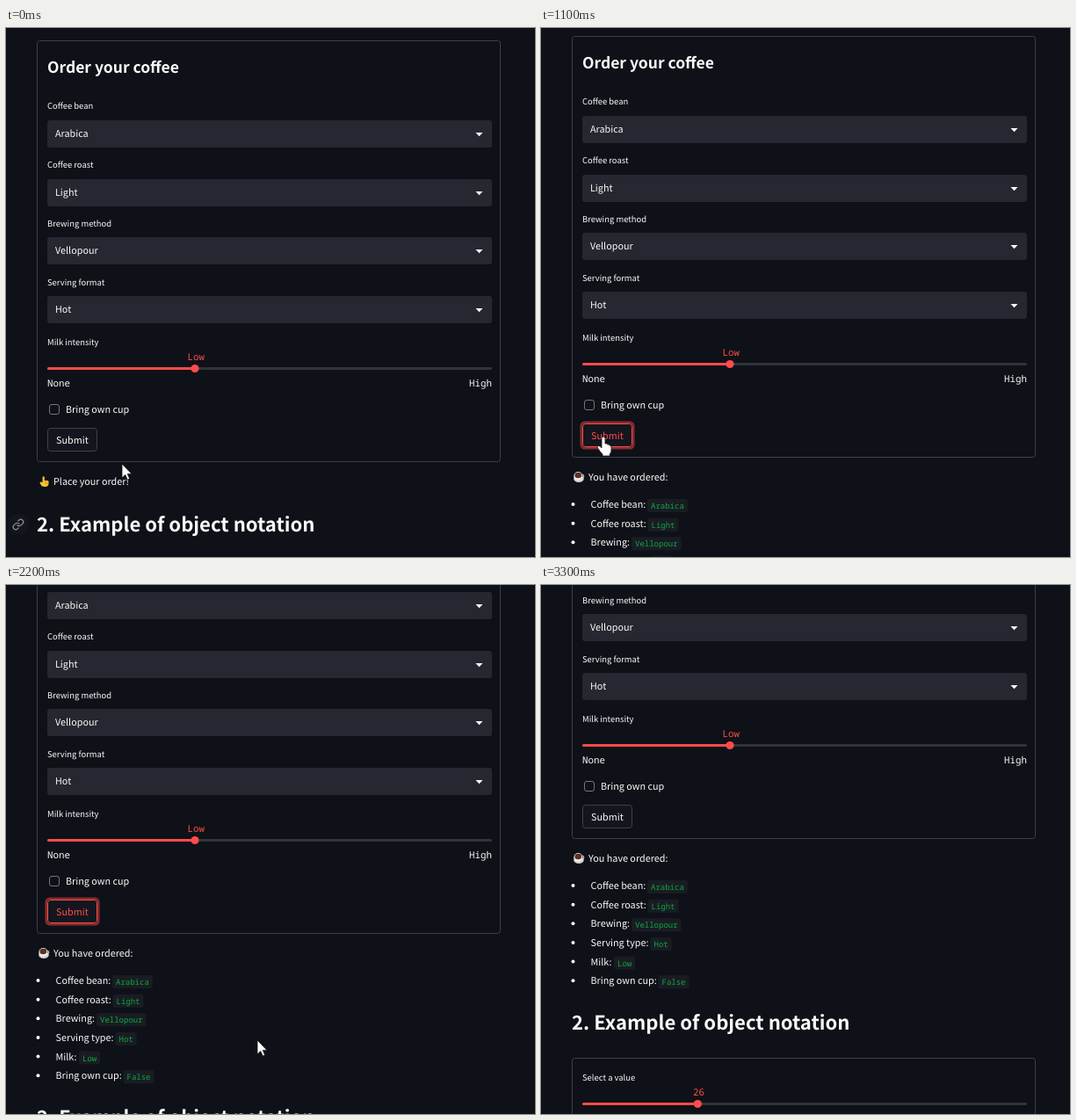
An HTML page that plays this animation: 602x602 px, repeating every 3.4 s.

```html
<!DOCTYPE html>
<html lang="en">
<head>
<meta charset="utf-8">
<title>Order form</title>
<style>
  html, body { margin: 0; height: 100%; overflow: hidden; background: #0e1117; }
  svg { display: block; width: 602px; height: 602px; }
  text { font: 10.8px "Noto Sans CJK JP", "Noto Sans CJK SC", "Noto Sans", sans-serif; fill: #fafafa;
         text-rendering: geometricPrecision; white-space: pre; }
  .label { font-size: 9.45px; }
  .h2 { font-size: 22.1px; font-weight: 600; }
  .h3 { font-size: 17.5px; font-weight: 600; }
  .mono { font: 500 10.8px "Noto Sans Mono", "DejaVu Sans Mono", monospace; }
  .code { font: 9px "Noto Sans Mono", "DejaVu Sans Mono", monospace; fill: #09ab3b; }
  .red { fill: #ff4b4b; }
  .box { fill: none; stroke: #3d4046; }
  .cursor path { fill: #fff; stroke: #111; stroke-width: .8; stroke-linejoin: round; }
  #button rect { fill: #13161e; stroke: #3f4148; }
  #button #ring { fill: none; stroke: #ff4b4b; stroke-opacity: .5; stroke-width: 2.4; }
  #button.hot text { fill: #ff4b4b; }
  #button.hot #edge { stroke: #ff4b4b; }
</style>
</head>
<body>
<svg viewBox="0 0 602 602">
  <g id="page"></g>
  <g id="arrow" class="cursor"><path d="M0 0V16L3.7 12.5 6.2 18 8.7 17 6.3 11.4H11Z"/></g>
  <g id="hand" class="cursor"><path d="M-2 2A2 2 0 0 1 2 2V8Q4 7 4.6 9Q6.6 8 7 10Q9 9.5 9 12V16Q9 18 7.3 20V22H-1V20Q-4 17-6.5 13Q-7.5 11-6 10.5Q-4 10-2 13Z"/></g>
</svg>
<script>
const $ = id => document.getElementById(id);
const text = (s, x, y, cls = '', anchor = 'start') =>
  `<text x="${x}" y="${y}" class="${cls}" text-anchor="${anchor}">${s}</text>`;
const rect = (x, y, w, h, r, attrs) =>
  `<rect x="${x}" y="${y}" width="${w}" height="${h}" rx="${r}" ${attrs}/>`;

const select = (label, value, i) => {
  const y = Math.round(105 + i * 66.7);
  return text(label, 47, 92 + i * 67, 'label') +
    rect(47, y, 506, 31, 3, 'fill="#262730"') +
    text(value, 56, y + 19) +
    `<path d="M534.5 ${y + 14}h8l-4 4.2z" fill="#fafafa"/>`;
};

const slider = (label, value, x, y) =>
  text(label, 47, y - 27, 'label') +
  text(value, x + 1.2, y - 10, 'mono red', 'middle') +
  rect(47, y - 1.5, 506, 3, 1.5, 'fill="#31333b"') +
  rect(47, y - 1.5, x - 47, 3, 1.5, 'class="red"') +
  `<circle cx="${x}" cy="${y}" r="4.6" class="red"/>`;

const orderLine = ([label, value, x], i) => {
  const y = 551 + i * 21.65;
  return `<circle cx="36.5" cy="${y - 4}" r="2" fill="#fafafa"/>` +
    text(label + ':', 56.5, y) +
    rect(x - 4, y - 10, value.length * 5.4 + 8, 15, 2.5, 'fill="#1a1c24"') +
    text(value, x, y + 1, 'code');
};

const method = 'Vellopour';
const selects = [['Coffee bean', 'Arabica'], ['Coffee roast', 'Light'],
  ['Brewing method', method], ['Serving format', 'Hot']];
const order = [['Coffee bean', 'Arabica', 125], ['Coffee roast', 'Light', 125.5],
  ['Brewing', method, 107], ['Serving type', 'Hot', 128.5],
  ['Milk', 'Low', 87], ['Bring own cup', 'False', 137.5]];

$('page').innerHTML =
  rect(35.5, 14.5, 527, 479, 3, 'class="box"') +
  text('Order your coffee', 47, 51, 'h3') +
  selects.map(([label, value], i) => select(label, value, i)).join('') +
  slider('Milk intensity', 'Low', 215, 387.5) +
  text('None', 47, 407.5, 'mono') + text('High', 553, 407.5, 'mono', 'end') +
  rect(49.5, 428.5, 11, 11, 2.5, 'fill="none" stroke="#74767c"') +
  text('Bring own cup', 68, 438) +
  `<g id="button">${rect(45.7, 453.7, 59.6, 29.6, 4, 'id="ring"')}
    ${rect(47.5, 455.5, 56, 26, 3, 'id="edge"')}${text('Submit', 57, 473)}</g>` +
  `<g id="before">
    <path d="M41.6 517V511.3a1.1 1.1 0 0 1 2.2 0V515h3.7q1 .3 1 1.5v2.2q-.6 3.3-3.6 3.3h-2.2q-2.6-.5-3.7-3.3l-.6-1.7q1.5-1.2 3.2 0z" fill="#fcc534"/>
    <path d="M43.8 516.5h4M44 518.5h4" stroke="#c98a1c" stroke-width=".7"/>
    ${text('Place your order!', 54, 520)}</g>` +
  `<g id="after">
    <ellipse cx="43" cy="518" rx="5.8" ry="4" fill="#d5d3d3"/>
    <circle cx="47" cy="515" r="1.8" fill="none" stroke="#e4e2e2"/>
    <circle cx="42.3" cy="515" r="5" fill="#efeded"/>
    <ellipse cx="42.3" cy="514" rx="3.9" ry="3.3" fill="#5c3222"/>
    ${text('You have ordered:', 54, 520)}${order.map(orderLine).join('')}</g>` +
  `<g id="next">
    <g id="link"><circle cx="14" cy="565" r="12" fill="#13161d"/>
      <path transform="translate(7 558) scale(.58)" fill="none" stroke="#94969b" stroke-width="2" stroke-linecap="round"
        d="M10 13a5 5 0 0 0 7.54.54l3-3a5 5 0 0 0-7.07-7.07l-1.72 1.71M14 11a5 5 0 0 0-7.54-.54l-3 3a5 5 0 0 0 7.07 7.07l1.71-1.71"/></g>
    ${text('2. Example of object notation', 35, 573, 'h2')}
    ${rect(35.5, 605.5, 527, 300, 3, 'class="box"')}
    ${slider('Select a value', '26', 178.3, 657.5)}</g>`;

// Each key is [time, value, ...]; values are linear in between.
const track = (keys, t) => {
  const i = keys.findIndex(k => k[0] > t);
  if (i < 0) return keys[keys.length - 1].slice(1);
  const a = keys[i - 1], b = keys[i], p = (t - a[0]) / (b[0] - a[0]);
  return a.slice(1).map((v, n) => v + (b[n + 1] - v) * p);
};
const pointer = [[0, 132, 496], [100, 129, 494], [300, 104, 484], [500, 75, 468], [600, 71, 465],
  [1500, 71, 465], [1600, 90, 474], [1700, 121, 485], [1900, 218, 505], [2100, 286, 518]];
const scroll = [[0, 0], [800, 0], [900, 5], [2100, 5], [2200, 97], [2300, 105],
  [2400, 150], [2500, 197], [2600, 205]];
const show = (id, on) => $(id).style.display = on ? '' : 'none';
const move = (id, x, y) => $(id).setAttribute('transform', `translate(${x} ${y})`);

function draw() {
  const t = Math.floor(performance.now() % 3400 / 100) * 100;
  const [x, y] = track(pointer, t), [top] = track(scroll, t);
  const ordered = t >= 900, focused = t >= 800 && t < 2900;
  const over = x > 47 && x < 104 && y + top > 455 && y + top < 482;
  move('page', 0, -Math.round(top));
  move('next', 0, ordered ? 138 : 0);
  move('arrow', x, y);
  move('hand', x, y);
  show('arrow', !over && t < 2600);
  show('hand', over);
  show('before', !ordered);
  show('after', ordered);
  show('link', t < 200);
  show('ring', focused);
  $('button').setAttribute('class', over || focused ? 'hot' : '');
  requestAnimationFrame(draw);
}
draw();
</script>
</body>
</html>
```
